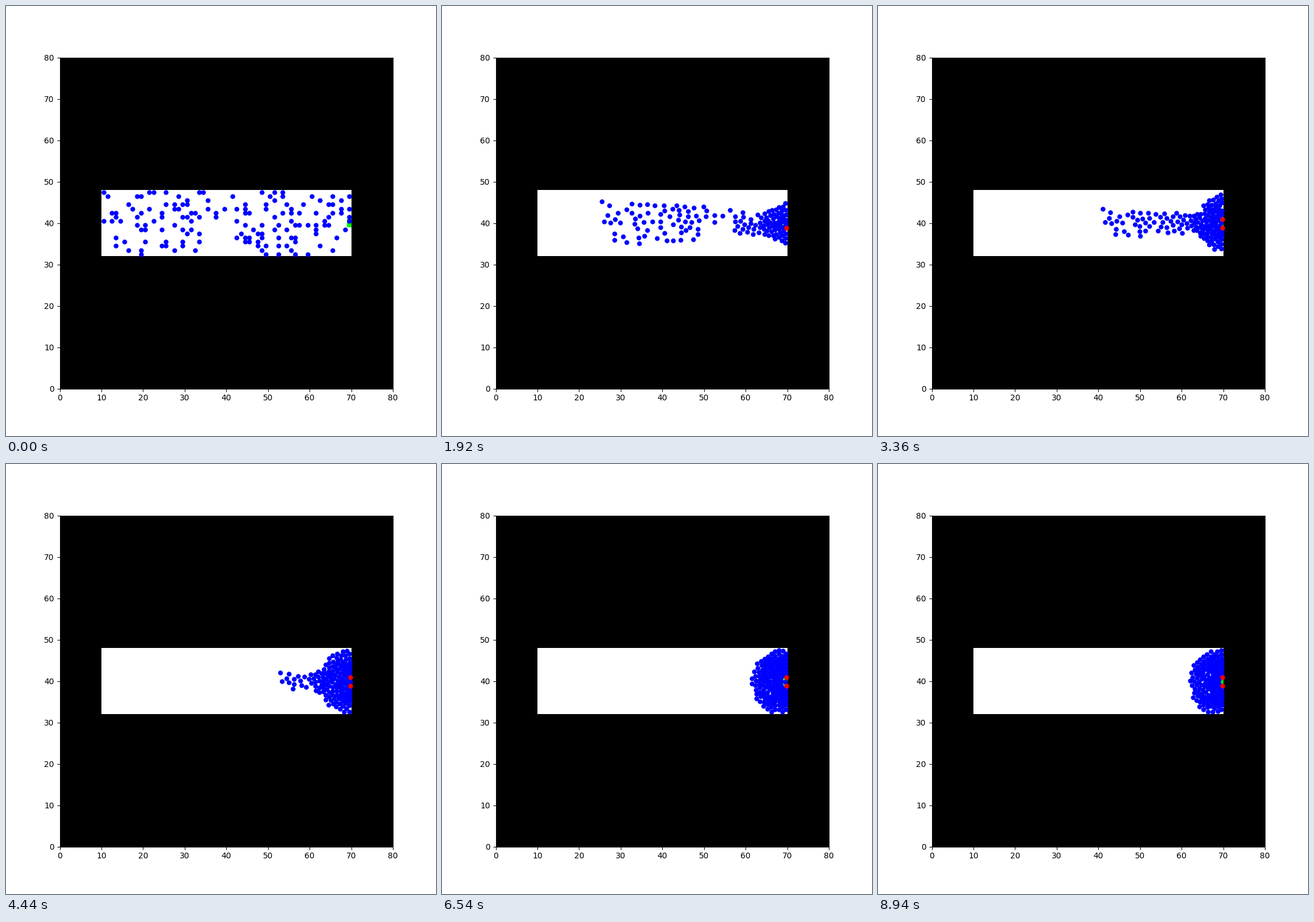
Write a matplotlib script that moves like this. It is 748 px wide and 748 px high and loops after 9 s.

```python
import numpy as np
import matplotlib.pyplot as plt
from matplotlib.animation import FuncAnimation
from matplotlib.patches import Rectangle

FRAMES, INTERVAL = 150, 60
SUBSTEPS = 10
X0, X1, Y0, Y1 = 10, 70, 32, 48        # room
DOOR = np.array([70.0, 40.0])
SPEED, RELAX = 0.665, 9.8              # desired speed, frames to reach it
PUSH, RANGE = 0.08, 0.08               # repulsion at distance 1, fall-off
EXIT_GAP = 6                           # frames between two people leaving
CASUALTIES = {28: (69.7, 38.85), 44: (69.7, 40.95)}

# occupied columns, row by row from the top of the room
ROWS = [
    [10, 21, 22, 25, 33, 34, 48, 51, 53],
    [11, 18, 19, 28, 41, 50, 53, 60, 65, 69],
    [30, 35, 51, 62, 67],
    [16, 25, 27, 29, 30, 44, 49, 54, 58, 64, 65],
    [17, 21, 27, 28, 35, 39, 42, 44, 49, 55, 67, 69],
    [12, 13, 19, 24, 31, 32, 37, 44, 45, 53, 55, 57, 61, 65, 67],
    [13, 18, 24, 29, 30, 33, 37, 51, 64, 69],
    [10, 12, 14, 22, 31, 42, 55, 63, 69],
    [18, 20, 27, 44, 48, 52, 56, 57, 59, 61, 63, 64],
    [19, 20, 24, 29, 31, 46, 51, 54, 61, 68],
    [30, 33, 43, 47, 48, 61],
    [13, 42, 44, 45, 48, 52, 55, 56, 66],
    [15, 20, 25, 29, 33, 44, 45, 47, 56],
    [13, 24, 25, 29, 47, 49, 52, 54, 62],
    [16, 19, 27, 32, 48, 55, 65],
    [19, 49, 52, 56, 59],
]


def repulsion(dist):
    return np.minimum(PUSH * np.exp((1 - dist) / RANGE), 2.0)


def acceleration(pos, vel):
    to_door = DOOR - pos
    reach = np.maximum(np.hypot(*to_door.T), 0.3)[:, None]
    acc = (SPEED * to_door / reach - vel) / RELAX

    gap = pos[:, None] - pos[None]
    dist = np.hypot(gap[..., 0], gap[..., 1])
    np.fill_diagonal(dist, 99.0)
    force = repulsion(dist) / np.maximum(dist, 0.05)
    acc += (force[..., None] * gap).sum(axis=1)

    # contact friction
    touch = 0.3 * np.clip((1.05 - dist) / 0.2, 0, 1)
    acc += touch @ vel - touch.sum(axis=1)[:, None] * vel

    x, y = pos.T
    acc[:, 0] += repulsion(x - X0 + 0.5) - repulsion(X1 - x + 0.5)
    acc[:, 1] += repulsion(y - Y0 + 0.5) - repulsion(Y1 - y + 0.5)
    return acc


def simulate():
    pos = np.array([(col + 0.5, Y1 - 0.5 - row)
                    for row, cols in enumerate(ROWS) for col in cols])
    vel = np.zeros_like(pos)
    fallen = np.zeros(len(pos), bool)
    states = [(pos.copy(), fallen.copy())]
    dt = 1 / SUBSTEPS
    for frame in range(1, FRAMES):
        for _ in range(SUBSTEPS):
            vel = vel + dt * acceleration(pos, vel)
            vel[fallen] = 0
            pos = pos + dt * vel
            free = ~fallen
            pos[free] = np.clip(pos[free], (X0 + 0.3, Y0 + 0.3),
                                (X1 - 0.25, Y1 - 0.3))
        if frame in CASUALTIES:
            spot = np.array(CASUALTIES[frame])
            dist = np.hypot(*(pos - spot).T) + 99 * fallen
            who = dist.argmin()
            pos[who], vel[who], fallen[who] = spot, 0, True
        if frame % EXIT_GAP == EXIT_GAP - 1:
            dist = np.hypot(*(pos - DOOR).T) + 99 * fallen
            who = dist.argmin()
            if dist[who] < 1.2:
                keep = np.arange(len(pos)) != who
                pos, vel, fallen = pos[keep], vel[keep], fallen[keep]
        states.append((pos.copy(), fallen.copy()))
    return states


STATES = simulate()

fig, ax = plt.subplots(figsize=(7.48, 7.48), dpi=100)
ax.set_xlim(0, 80)
ax.set_ylim(0, 80)
ax.set_facecolor("black")
ax.add_patch(Rectangle((X0, Y0), X1 - X0, Y1 - Y0, color="white", lw=0))
ax.add_patch(Rectangle((69, 39), 1, 2, color="lime", lw=0))
people, = ax.plot([], [], "o", color="blue", ms=5)
victims, = ax.plot([], [], "o", color="red", ms=5)


def update(frame):
    pos, fallen = STATES[frame]
    people.set_data(*pos[~fallen].T)
    victims.set_data(*pos[fallen].T)
    return people, victims


anim = FuncAnimation(fig, update, frames=FRAMES, interval=INTERVAL,
                     init_func=lambda: update(0), repeat=True,
                     repeat_delay=0, blit=False)
plt.show()
```
